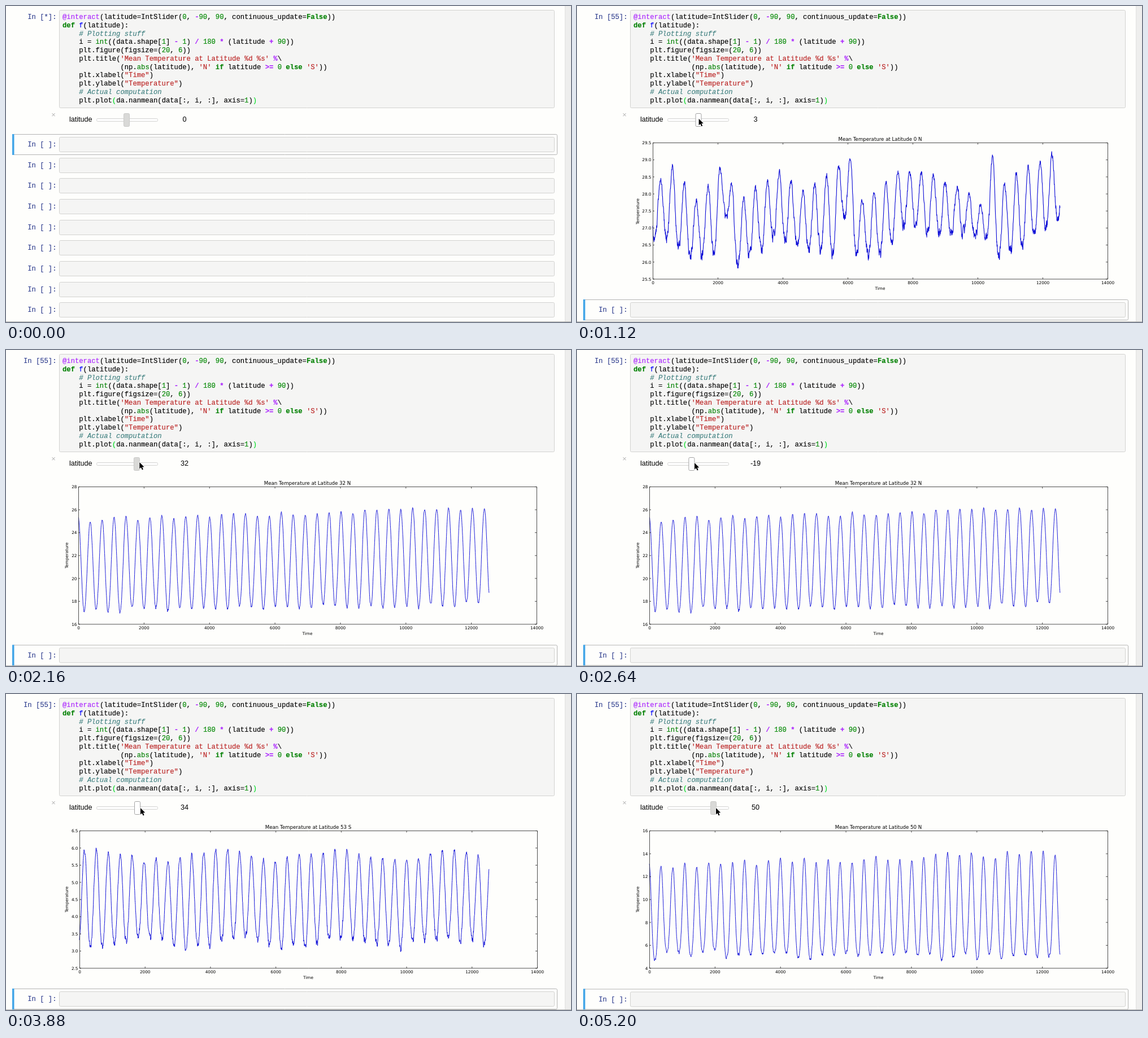
Recreate the animation shown at these times as an HTML page with a canvas. Size 1000x560 px, loop 5.24 s.

```html
<!DOCTYPE html>
<html lang="en">
<head>
<meta charset="utf-8">
<title>Notebook slider</title>
<style>
html, body { margin: 0; width: 100%; height: 100%; overflow: hidden; background: #fefefc; }
canvas { display: block; }
</style>
</head>
<body>
<canvas id="stage" width="1000" height="560"></canvas>
<script>
const g = document.getElementById('stage').getContext('2d');
const LOOP = 5240, STEP = 40;
const MONO = '"Liberation Mono", "Courier New", monospace';
const SANS = '"Liberation Sans", Arial, sans-serif';
const PLOT = '"DejaVu Sans", sans-serif';
const PAGE = '#fefefc', CELL = '#f5f5f4', EDGE = '#d2d2d0';
const CHAR = 7.32, LINE = 14.78;

const code = `@interact(latitude=IntSlider(0, -90, 90, continuous_update=False))
def f(latitude):
    # Plotting stuff
    i = int((data.shape[1] - 1) / 180 * (latitude + 90))
    plt.figure(figsize=(20, 6))
    plt.title('Mean Temperature at Latitude %d %s' %\\
              (np.abs(latitude), 'N' if latitude >= 0 else 'S'))
    plt.xlabel("Time")
    plt.ylabel("Temperature")
    # Actual computation
    plt.plot(da.nanmean(data[:, i, :], axis=1))`.split('\n');

// Token rules: pattern, colour, font style
const rules = [
  [/^#.*/, '#408080', 'italic'],
  [/^('[^']*'|"[^"]*")/, '#ba2121', ''],
  [/^@\w+/, '#aa22ff', ''],
  [/^(def|if|else|False)\b/, '#008000', 'bold'],
  [/^(int|abs)\b/, '#008000', ''],
  [/^f\b/, '#0000ff', ''],
  [/^\d+/, '#008800', ''],
  [/^(>=|[-+*\/%])/, '#aa22ff', 'bold'],
  [/^(\w+|\s+|.)/, '#000', '']
];

function text(s, x, y, font, color = '#000', align = 'left') {
  g.font = font;
  g.fillStyle = color;
  g.textAlign = align;
  g.fillText(s, x, y);
}

function mono(s, x, y, color, style = '') {
  text(s, x, y, `${style} 12.2px ${MONO}`, color);
  g.strokeStyle = color;
  g.lineWidth = 0.15;
  g.strokeText(s, x, y);
}

function box(x, y, w, h, fill, edge) {
  g.beginPath();
  g.roundRect(x + 0.5, y + 0.5, w - 1, h - 1, 2);
  g.fillStyle = fill;
  g.fill();
  g.strokeStyle = edge;
  g.lineWidth = 1;
  g.stroke();
}

function drawCode() {
  box(94, 7, 877, 174, CELL, EDGE);
  code.forEach((line, row) => {
    const y = 23 + row * LINE;
    for (let col = 0; col < line.length;) {
      const rest = line.slice(col);
      let [pattern, color, style] = rules.find(r => r[0].test(rest));
      const token = rest.match(pattern)[0];
      // Matched pair of brackets in the last line
      if (row === 10 && (col === 12 || col === line.length - 1)) color = '#00dd22';
      if (token.trim()) mono(token, 100 + col * CHAR, y, color, style);
      col += token.length;
    }
  });
}

function prompt(label, y) {
  mono(label, 89.5 - label.length * CHAR, y, '#303f8f');
}

function emptyCell(y, selected) {
  if (selected) {
    box(11, y - 5, 965, 37, PAGE, '#b4b4b4');
    g.fillStyle = '#42a5e8';
    g.fillRect(11, y - 5, 3.5, 37);
  }
  box(94, y, 877, 27, CELL, EDGE);
  prompt('In [ ]:', y + 17);
}

function random(seed) {
  return () => (seed = (seed * 16807) % 2147483647) / 2147483647;
}

// Value at time t between key rows, each row starting with its time
function between(rows, t) {
  const n = rows.findIndex(r => r[0] > t);
  if (n < 0) return rows[rows.length - 1];
  if (n === 0) return rows[0];
  const a = rows[n - 1], b = rows[n], k = (t - a[0]) / (b[0] - a[0]);
  return a.map((v, i) => v + (b[i] - v) * k);
}

// Warm and cold years at the equator: year, height in pixels
const warm = [[0, 305], [1, 280], [3, 346], [5, 287], [7, 340], [10, 292], [12, 332], [16, 265],
  [17, 343], [20, 293], [23, 296], [27, 345], [28, 268], [29, 313], [33, 260]];
const cold = [[0, 410], [2, 448], [4, 435], [5, 366], [6, 460], [9, 412], [14, 438], [15, 371],
  [16, 440], [18, 440], [20, 390], [27, 412], [28, 446], [33, 380]];

// Yearly cycles: heights of crest and trough for year i, first crest at x = first
const charts = [
  {
    at: 280, title: '0 N', left: 134, right: 939, bottom: 484, low: 25.5, high: 29.5, unit: 0.5,
    first: 148, sharp: 1.25, noise: 7.5, spread: 4, weight: 1.1, cellY: 525,
    crest: i => between(warm, i)[1], trough: i => between(cold, i)[1]
  },
  {
    at: 1880, title: '32 N', left: 128, right: 939, bottom: 486, low: 16, high: 28, unit: 2,
    first: 149, sharp: 1.05, noise: 2.2, spread: 4, weight: 0.9, cellY: 527.5,
    crest: i => 301 - 0.65 * i, trough: i => 462 - 0.35 * i
  },
  {
    at: 3600, title: '53 S', left: 130, right: 940, bottom: 486, low: 2.5, high: 6.5, unit: 0.5,
    first: 138.8, sharp: 1.15, noise: 5, spread: 4, weight: 0.95, cellY: 527,
    crest: i => 286 - 9 * Math.cos((i - 1) * 0.63), trough: i => 440 + 8 * Math.cos((i - 17) * 0.73)
  },
  {
    at: 4600, title: '50 N', left: 128, right: 939, bottom: 486, low: 4, high: 16, unit: 2,
    first: 148.5, sharp: 1.4, noise: 2.4, spread: 7, weight: 0.9, cellY: 527.5,
    crest: i => 304 - 0.65 * i, trough: i => 462 - 3 * Math.sin(i * 0.45)
  }
];

function curve(c, seed) {
  const path = new Path2D(), rand = random(seed);
  const jitter = size => (rand() - 0.5) * 2 * size;
  const period = (c.right - c.left) / 14000 * 365;
  const years = Array.from({ length: 37 }, (_, n) =>
    ({ crest: c.crest(n - 1) + jitter(c.spread), trough: c.trough(n - 1) + jitter(c.spread) }));
  let drift = 0;
  for (let x = c.left; x < 855; x += 0.3) {
    const u = (x - c.first) / period + 1, i = Math.floor(u), f = u - i;
    const { crest } = years[f < 0.5 ? i : i + 1], { trough } = years[i];
    const w = (0.5 + 0.5 * Math.cos(f * 2 * Math.PI)) ** c.sharp;
    drift = 0.65 * drift + jitter(c.noise);
    path.lineTo(x, trough + (crest - trough) * w + drift * (1 - 0.45 * w));
  }
  return path;
}
charts.forEach((c, i) => c.path = curve(c, 4711 + i * 97));

function tick(x, y, dx, dy) {
  g.beginPath();
  g.moveTo(x, y);
  g.lineTo(x + dx, y + dy);
  g.stroke();
}

function drawChart(c) {
  const top = 242.5, { left, right, bottom } = c, mid = (left + right) / 2;
  const small = `7.3px ${PLOT}`;
  g.strokeStyle = '#0a0ad6';
  g.lineWidth = c.weight;
  g.lineJoin = 'round';
  g.stroke(c.path);

  g.strokeStyle = '#222';
  g.lineWidth = 0.8;
  g.strokeRect(left + 0.5, top, right - left, bottom - top);
  for (let v = 0; v <= 14000; v += 2000) {
    const x = left + 0.5 + (right - left) * v / 14000;
    tick(x, top, 0, 3);
    tick(x, bottom, 0, -3);
    text(v, x, bottom + 8.7, small, '#000', 'center');
  }
  for (let v = c.low; v <= c.high; v += c.unit) {
    const y = bottom - (bottom - top) * (v - c.low) / (c.high - c.low);
    tick(left, y, 3, 0);
    tick(right, y, -3, 0);
    text(v.toFixed(c.unit < 1 ? 1 : 0), left - 2.5, y + 2.7, small, '#000', 'right');
  }
  text('Mean Temperature at Latitude ' + c.title, mid, 239, `8.65px ${PLOT}`, '#000', 'center');
  text('Time', mid, bottom + 19.3, small, '#000', 'center');
  g.save();
  g.translate(110, 364);
  g.rotate(-Math.PI / 2);
  text('Temperature', 0, 0, small, '#000', 'center');
  g.restore();
}

// Pointer: time, x, y, slider value
const moves = [
  [440, 398, 172, 0], [560, 379, 180, 0], [960, 214, 201, 0], [1080, 214, 200, 0],
  [1560, 233, 197, 32], [2200, 236.5, 199, 32], [2640, 208, 200, -19], [3280, 185, 202, -53],
  [3640, 187, 202, -53], [3880, 238, 202, 34], [4280, 246, 202, 50]
];
const presses = [[1080, 1600], [2200, 3320], [3680, 4320]];

function drawSlider(value, pressed) {
  const x = 213.5 + value * 0.56;
  text('×', 84, 197, `13px ${SANS}`, '#b5b5b5', 'center');
  text('latitude', 112, 205, `12.6px ${SANS}`);
  text(Math.round(value), 316, 205, `12.6px ${SANS}`, '#000', 'center');
  box(160, 199, 109, 6, '#fdfdfd', '#d4d4d2');
  box(x - 5.5, 190, 11, 24, pressed ? '#fff' : '#d9d9d7', pressed ? '#a3a3a3' : '#c9c9c7');
}

function drawPointer(x, y) {
  g.beginPath();
  [[0, 0], [0, 11.5], [2.7, 9.2], [4.7, 13.5], [6.6, 12.6], [4.7, 8.5], [8.2, 8.3]]
    .forEach(([dx, dy]) => g.lineTo(x + dx, y + dy));
  g.closePath();
  g.strokeStyle = '#fff';
  g.lineWidth = 1.6;
  g.stroke();
  g.fillStyle = '#000';
  g.fill();
}

function draw(t) {
  g.fillStyle = PAGE;
  g.fillRect(0, 0, 1000, 560);
  const chart = charts.filter(c => c.at <= t).pop();
  const [, x, y, value] = between(moves, t);

  drawCode();
  prompt(chart ? 'In [55]:' : 'In [*]:', 23);
  drawSlider(value, presses.some(([from, to]) => t >= from && t < to));
  if (chart) {
    drawChart(chart);
    emptyCell(chart.cellY, true);
  } else {
    for (let i = 0; i < 9; i++) emptyCell(Math.round(232 + i * 36.65), i === 0);
  }

  g.fillStyle = '#eeeeed';
  g.fillRect(989, 0, 11, 560);
  g.fillStyle = '#e2e2e0';
  g.fillRect(989, 0, 1, 560);
  g.fillStyle = '#b4b4b2';
  g.fillRect(0, 559, 1000, 1);
  if (t >= moves[0][0]) drawPointer(x, y);
}

const start = performance.now();
function frame() {
  const t = (performance.now() - start) % LOOP;
  draw(Math.floor(t / STEP) * STEP);
  requestAnimationFrame(frame);
}
frame();
</script>
</body>
</html>
```
